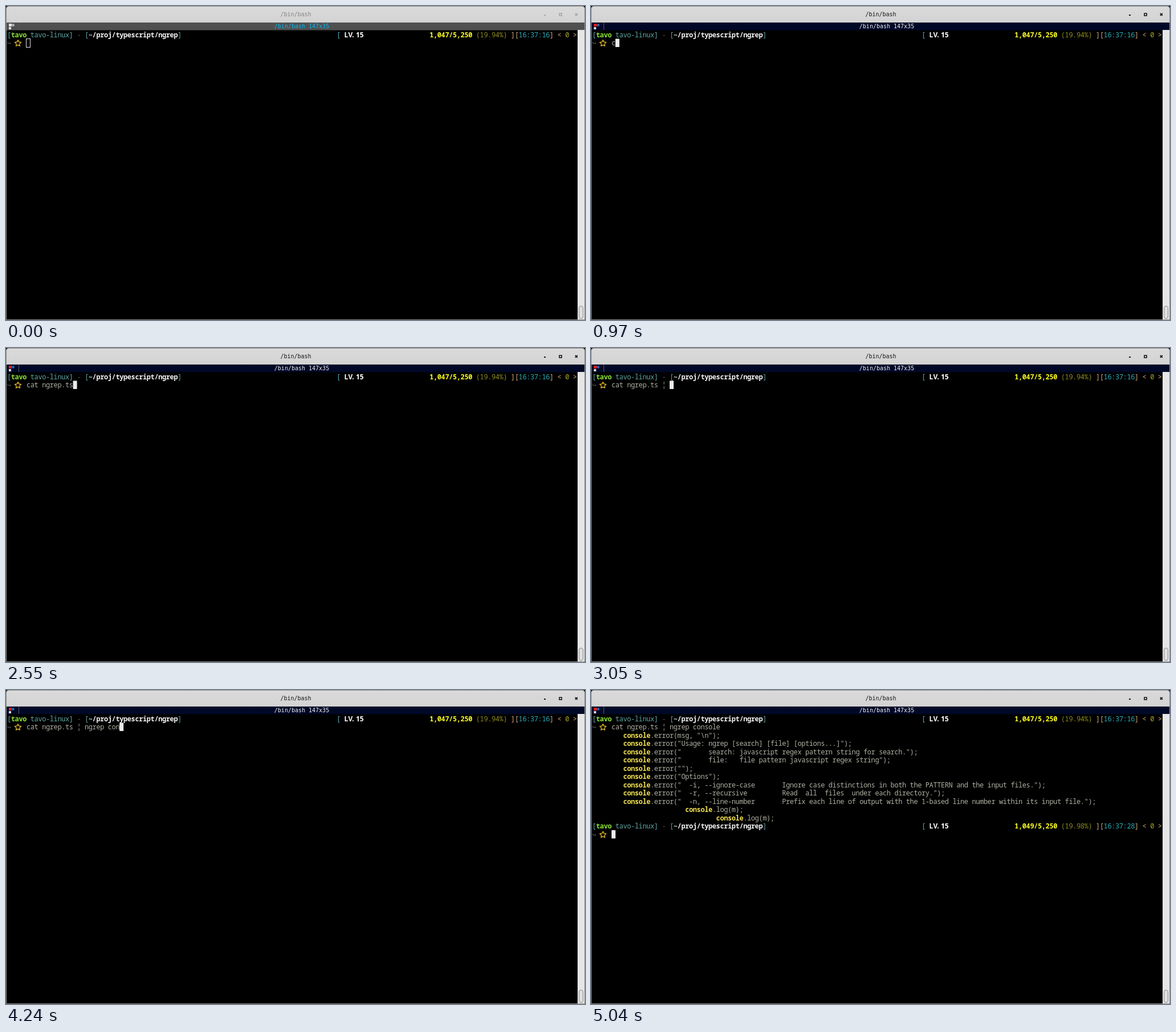
An HTML page for the animation above (7.86 s loop, 1016 by 551 pixels).

```html
<!DOCTYPE html>
<html lang="en">
<head>
<meta charset="utf-8">
<title>Terminal</title>
<style>
  html, body { margin: 0; width: 100%; height: 100%; overflow: hidden; background: #000; }
  svg { display: block; width: 1016px; height: 551px; }
  text { white-space: pre; font: 12px "Noto Sans Mono", "DejaVu Sans Mono", monospace; letter-spacing: -0.4px; }
  .bold { font-weight: 700; }
  .level { font: 700 12px "Noto Sans", sans-serif; letter-spacing: 0; }
  .bar { font: 10px "DejaVu Sans Mono", monospace; letter-spacing: 0; text-anchor: middle; }
</style>
</head>
<body>
<svg id="stage" viewBox="0 0 1016 551">
  <defs>
    <linearGradient id="chrome" x2="0" y2="1">
      <stop stop-color="#dadada"/><stop offset="1" stop-color="#d3d3d3"/>
    </linearGradient>
  </defs>
  <rect width="1016" height="551"/>
  <path d="M0 29V5Q0 0 5 0H1011Q1016 0 1016 5V29Z" fill="#8c8c8c"/>
  <path d="M1 29V5Q1 1 5 1H1011Q1015 1 1015 5V29Z" fill="url(#chrome)"/>
  <rect id="tabs" y="29" width="1016" height="13.5"/>
  <path d="M22.5 29V42" stroke="#5c5c66"/>
  <g id="group">
    <rect x="5" y="31" width="5" height="5"/>
    <rect x="10.5" y="31.5" width="4" height="4"/>
    <rect x="5" y="37" width="4" height="4"/>
  </g>
  <g id="buttons">
    <rect x="944" y="15" width="3" height="2"/>
    <path d="M971 13h4v4h-4z" fill="none" stroke-width="1.6"/>
    <path d="M998.8 12.8l4 4m0-4l-4 4" stroke-width="1.7"/>
  </g>
  <text id="title" class="bar" x="508.5" y="18">/bin/bash</text>
  <text id="tab" class="bar" x="519" y="39">/bin/bash 147x35</text>
  <rect x="1003" y="42" width="12" height="508" fill="#e6e6e6"/>
  <rect x="1005.5" y="526.5" width="7" height="22" rx="3.5" fill="#dedede" stroke="#8d8d8d"/>
  <path d="M.5 29V550.5H1015.5V29" fill="none" stroke="#8c8c8c"/>
  <g id="screen"></g>
  <g id="output"></g>
  <rect id="cursor" width="7" height="14.5"/>
</svg>
<script>
const LOOP = 7860, FOCUS = 40, ENTER = 5040;
const COL = 6.8, ROW = 14.5, LEFT = 2, TOP = 43;
const COMMAND = "cat ngrep.ts ¦ ngrep console";
const TEXT = "#b0afa3", TEAL = "#5fa5a5", SAND = "#d6a878";

// time in ms, characters typed
const KEYS = [
  [970, 1], [1110, 2], [1200, 3], [1290, 4], [1560, 6], [1840, 8],
  [2030, 9], [2300, 10], [2450, 11], [2550, 12], [2800, 13], [3050, 15],
  [3340, 17], [3570, 18], [3750, 20], [4080, 22], [4240, 24], [4470, 26],
  [4660, 27], [4950, 28]
];

// column, rest of the line after "console"
const LINES = [
  [8, '.error(msg, "\\n");'],
  [8, '.error("Usage: ngrep [search] [file] [options...]");'],
  [8, '.error("       search: javascript regex pattern string for search.");'],
  [8, '.error("       file:   file pattern javascript regex string");'],
  [8, '.error("");'],
  [8, '.error("Options");'],
  [8, '.error("  -i, --ignore-case       Ignore case distinctions in both the PATTERN and the input files.");'],
  [8, '.error("  -r, --recursive         Read  all  files  under each directory.");'],
  [8, '.error("  -n, --line-number       Prefix each line of output with the 1-based line number within its input file.");'],
  [24, ".log(m);"],
  [32, ".log(m);"]
];

const $ = id => document.getElementById(id);

function add(parent, tag, attrs) {
  const node = document.createElementNS("http://www.w3.org/2000/svg", tag);
  for (const name in attrs) node.setAttribute(name, attrs[name]);
  return parent.appendChild(node);
}

function put(parent, row, col, string, fill, cls = "") {
  const node = add(parent, "text", {
    x: LEFT + col * COL, y: TOP + row * ROW + 11.5, fill, class: cls
  });
  node.textContent = string;
  return node;
}

function star(parent, x, y) {
  let d = "";
  for (let i = 0; i < 10; i++) {
    const r = i % 2 ? 2.9 : 5.8, a = i * Math.PI / 5;
    d += `${i ? "L" : "M"}${(x + r * Math.sin(a)).toFixed(2)} ${(y - r * Math.cos(a)).toFixed(2)}`;
  }
  add(parent, "path", {
    d: d + "Z", fill: "none", stroke: "#e9bd2e", "stroke-width": 1.3, "stroke-linejoin": "round"
  });
}

function prompt(parent, row, score, percent, clock) {
  const cells = [
    [0, "[", TEAL], [1, "tavo", "#8ae234", "bold"], [6, "tavo-linux", TEAL],
    [16, "]", TEAL], [18, "-", "#4d5550"], [20, "[", TEAL],
    [21, "~/proj/typescript/ngrep", "#f4f4f4", "bold"], [44, "]", TEAL],
    [85, "[", "#55acc8"], [109, score, "#fafa22", "bold"],
    [121, percent, "#8e8b20"], [130, "][", SAND], [132, clock, "#2aaebb"],
    [140, "]", SAND], [142, "<", SAND], [144, "0", "#a8a526"], [146, ">", SAND]
  ];
  for (const cell of cells) put(parent, row, ...cell);
  [..."LV.15"].forEach((c, i) => put(parent, row, 87 + i, c, "#fff", "level"));
  put(parent, row + 1, 0, "↪", "#555");
  star(parent, 21, TOP + (row + 1) * ROW + 8);
}

prompt($("screen"), 0, "1,047/5,250", "(19.94%)", "16:37:16");
const typed = put($("screen"), 1, 5, "", TEXT);

LINES.forEach(([col, rest], i) => {
  put($("output"), i + 2, col, "console", "#efdf50", "bold");
  put($("output"), i + 2, col + 7, rest, TEXT);
});
prompt($("output"), 13, "1,049/5,250", "(19.98%)", "16:37:28");

function paint(id, attrs) {
  for (const name in attrs) $(id).setAttribute(name, attrs[name]);
}

function draw(time) {
  const focused = time >= FOCUS, done = time >= ENTER;
  const count = KEYS.reduce((n, [at, size]) => time >= at ? size : n, 0);
  const ink = focused ? "#151515" : "#a6a6a6";

  paint("tabs", { fill: focused ? "#000827" : "#505050" });
  paint("title", { fill: focused ? "#151515" : "#858585" });
  paint("tab", { fill: focused ? "#f4f4f4" : "#08b9f2" });
  paint("buttons", { fill: ink, stroke: ink, "stroke-width": 0 });
  const squares = focused ? ["#f01818", "#1976b8", "#d8d8d8"] : ["#e0e0e0", "#bdbdbd", "#e0e0e0"];
  [...$("group").children].forEach((square, i) => square.setAttribute("fill", squares[i]));

  typed.textContent = COMMAND.slice(0, count);
  paint("output", { visibility: done ? "visible" : "hidden" });

  const x = LEFT + (done ? 5 : 5 + count) * COL;
  const y = TOP + (done ? 14 : 1) * ROW;
  paint("cursor", focused
    ? { x, y, width: 7, height: 14.5, fill: "#ececec", stroke: "none" }
    : { x: 35.5, y: 57.5, width: 7, height: 15, fill: "none", stroke: "#e4e4e4" });
}

function tick() {
  draw(performance.now() % LOOP);
  requestAnimationFrame(tick);
}
tick();
</script>
</body>
</html>
```
